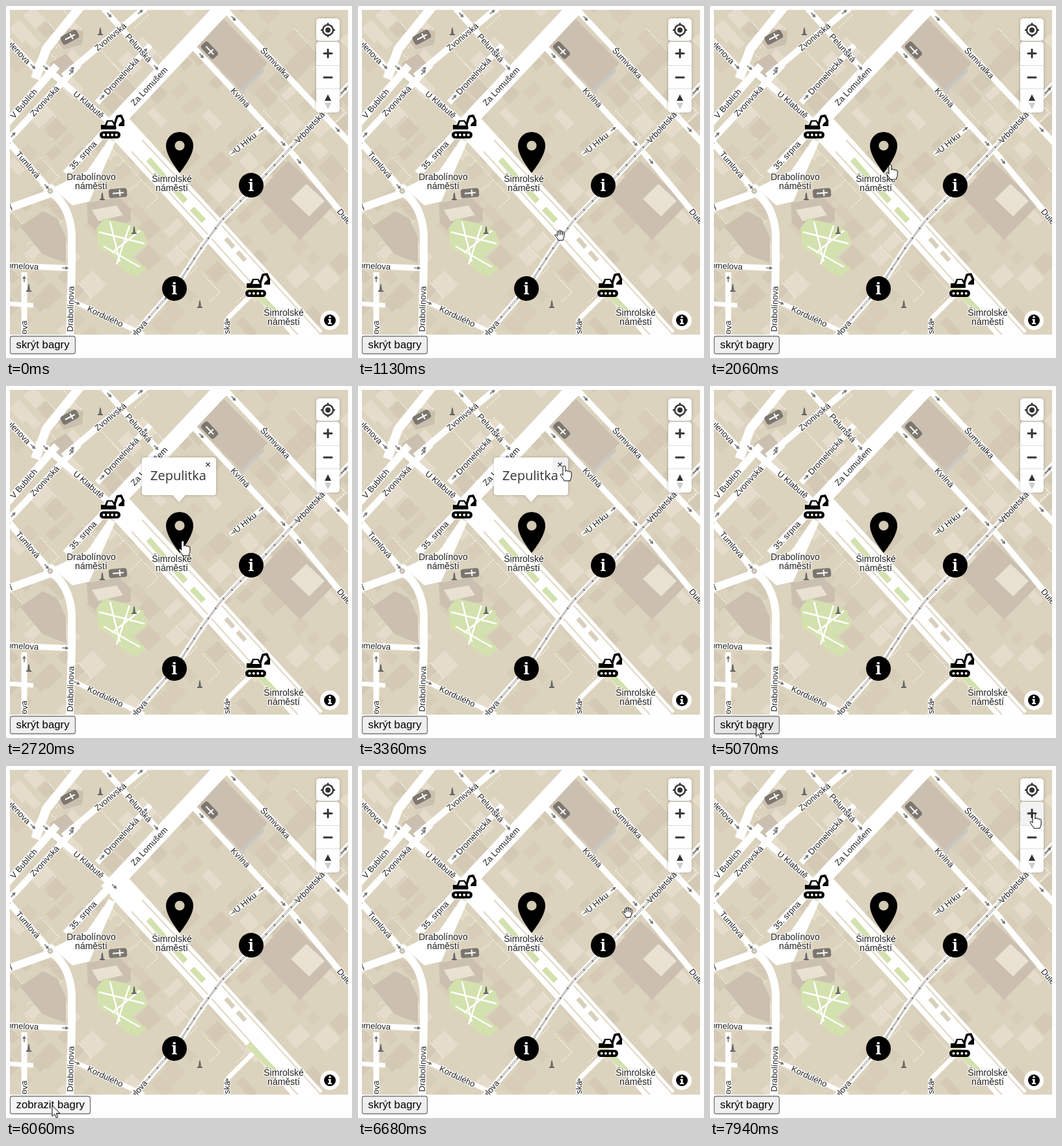
These frames come from a looping animation (532x542 px, 7.99 s). An HTML page:

```html
<!DOCTYPE html>
<html lang="cs">
<head>
<meta charset="utf-8">
<style>
html, body { margin: 0; width: 100%; height: 100%; overflow: hidden; background: #fefefe; }
svg { display: block; width: 532px; height: 542px; }
text { font-family: "Liberation Sans", Arial, sans-serif; }
.label { font-size: 13px; fill: #222; text-anchor: middle; stroke: #fff; stroke-width: 2.5px; stroke-opacity: .8; paint-order: stroke; stroke-linejoin: round; }
.square { font-size: 14px; }
.info { font: bold 25px "Noto Serif", serif; fill: #fff; text-anchor: middle; }
.line { fill: none; stroke-linejoin: round; }
.dots { stroke: #f8f4eb; stroke-width: 2; stroke-linecap: round; stroke-dasharray: 0 4.5; }
.panel { fill: #fff; filter: drop-shadow(0 0 2px rgba(0,0,0,.25)); }
.cursor { fill: #fff; stroke: #000; stroke-width: 1; stroke-linejoin: round; stroke-linecap: round; }
</style>
</head>
<body>
<svg viewBox="0 0 532 542">
  <defs>
    <clipPath id="frame"><path d="M6 6h520v500H6z"/></clipPath>
    <path id="tram" d="M530 119L440 216 385 275 330 332 300 373 263 430 190 514"/>
    <g id="digger">
      <rect y="27" width="32" height="11" rx="5.500"/>
      <path d="M2 24v-7h6l3-7h9l5 7v7z"/>
      <path class="line" stroke="#000" stroke-width="3.500" d="M22 19L27 4 33 3 37 12"/>
      <path d="M38 10v9h-9c0-5 4-5 6-9z"/>
      <path fill="#fff" d="M13 12h6l3 6H11z"/>
      <path class="line" stroke="#fff" stroke-width="4" stroke-linecap="round" stroke-dasharray="0 6.4" d="M6.500 32.500h20"/>
    </g>
    <path id="oneway" d="M-5 -.8H0V-3L5 0 0 3V.8H-5z" fill="#777"/>
    <path id="statue" d="M-4 6H4V4H2L1 -4Q0 -8 -1 -4L-2 4H-4z" fill="#666"/>
    <g id="church">
      <rect x="-14" y="-7" width="28" height="14" rx="4" fill="#7b766f"/>
      <path class="line" stroke="#fff" stroke-width="2" d="M-8 0H9M3-5V5"/>
    </g>
  </defs>

  <g clip-path="url(#frame)">
    <path fill="#dcd3be" d="M6 6h520v500H6z"/>
    <g id="blocks" transform="translate(266 256) rotate(47)"></g>
    <path fill="#cbc0af" d="M288 57L330 15 402 88 362 130zM385 290L434 238 505 306 452 360zM76 50l18-16 25 5-2 20-28 8zM68 88l24-15 14 16-19 22-20-3zM124 303l50-8 18 17v20l-32 6-16 12-18-15zM22 340l34-24 22 10 14 30v40l-36-14z"/>
    <path fill="#e9e1d2" d="M438 297l24-23 28 26-24 24zM132 314l38-7 10 15-38 9z"/>
    <path fill="#fff" d="M72 280l53-26 33-49 10 4-40 92-26 6z"/>
    <g id="roads" class="line" stroke="#fff">
      <path stroke-width="12" d="M72 288Q98 310 101 350V404"/>
      <path stroke-width="14" d="M45 112L62 66 115 0"/>
      <path stroke-width="7" d="M0 458L42 461M340 482L384 438"/>
    </g>

    <path fill="#d3e1ae" d="M139 342l12-15 34 8 26 11 6 23-24 17 23 18-15 13-21-9-18-25-20-10z"/>
    <path class="line" stroke="#fff" stroke-width="2.500" d="M143 348l70 18M160 332l15 62M190 338l-20 60M150 370l56 32M206 346l-43 34"/>

    <g class="line">
      <path stroke="#fff" stroke-width="40" d="M174 186L318 344 472 514"/>
      <path stroke="#e0d7c5" stroke-width="2" d="M193 224L306 347 454 512M209 206L330 336 486 508"/>
      <path stroke="#d3e1ae" stroke-width="9" d="M219 236L246 267M260 283L276 301M286 312L304 331M372 428L415 472"/>
      <path stroke="#d9d0bc" stroke-width="7" stroke-dasharray="18 9" d="M338 358L368 392"/>
      <use href="#tram" stroke="#fff" stroke-width="9"/>
      <use href="#tram" stroke="#8e8b86" y="-1.500"/>
      <use href="#tram" stroke="#8e8b86" y="1.500"/>
      <use href="#tram" stroke="#77746f" stroke-width="3" stroke-dasharray="2 17"/>
      <circle cx="68" cy="285" r="7" fill="#ddd4c1" stroke="#fff" stroke-width="7"/>
      <circle cx="68" cy="285" r="3.500" stroke="#999"/>
      <path stroke="#c9c7c4" stroke-width="5" d="M361 132L396 98"/>
    </g>
    <use href="#church" transform="translate(98 48) rotate(-28)"/>
    <use href="#church" transform="translate(313 68) rotate(47)"/>
    <use href="#church" transform="translate(172 288) rotate(-5)"/>
    <use href="#statue" x="145" y="39"/><use href="#statue" x="197" y="345"/>
    <use href="#statue" x="298" y="459"/><use href="#statue" x="148" y="293"/><use href="#statue" x="35" y="434"/>
    <g id="arrows"></g>
    <g id="labels"></g>
  </g>

  <g id="diggers"><use href="#digger" x="144" y="166"/><use href="#digger" x="368" y="410"/></g>
  <path fill-rule="evenodd" d="M267 257S246 232 246 215a21 21 0 0 1 42 0c0 17-21 42-21 42zM267 207.500a7.500 7.500 0 1 0 .01 0z"/>
  <circle cx="377" cy="276" r="19"/><text class="info" x="377" y="285">i</text>
  <circle cx="259" cy="435" r="19"/><text class="info" x="259" y="444">i</text>

  <rect class="panel" x="477" y="19" width="36" height="35" rx="5"/>
  <rect class="panel" x="477" y="55" width="36" height="109" rx="5"/>
  <path id="plusHover" fill="#f2f2f2" d="M482 55h26q5 0 5 5v31h-36V60q0-5 5-5z"/>
  <path class="line" stroke="#ddd" d="M477 91.500h36M477 127.500h36"/>
  <g class="line" stroke="#333" stroke-width="3">
    <circle cx="495" cy="37" r="8" stroke-width="2.500"/>
    <path stroke-width="2.500" d="M495 26v4M495 44v4M484 37h4M502 37h4"/>
    <path stroke-linecap="round" d="M489 73h12M495 67v12M489 110h12"/>
  </g>
  <circle cx="495" cy="37" r="4" fill="#333"/>
  <path fill="#333" d="M490 146l5-10 5 10z"/><path fill="#ccc" d="M490 149l5 10 5-10z"/>
  <circle cx="498" cy="484" r="15" fill="#fff"/><circle cx="498" cy="484" r="9"/>
  <path fill="#fff" d="M496.500 477.500h3v3h-3zM495.500 482h4v6h1.500v2h-6v-2h1.500v-4h-1z"/>

  <g id="popup">
    <path class="panel" d="M213 110h106q4 0 4 4v50q0 4-4 4h-43l-10 11-10-11h-43q-4 0-4-4v-50q0-4 4-4z"/>
    <path id="closeHover" fill="#f2f2f2" d="M299 110h20q4 0 4 4v18h-24z"/>
    <path class="line" stroke="#333" stroke-width="1.200" d="M307.500 118l6 6m0-6l-6 6"/>
    <text x="222" y="145" fill="#333" style="font:20px 'Open Sans',sans-serif">Zepulitka</text>
  </g>

  <rect id="button" x="6.500" y="508.500" height="27" rx="3" stroke="#767676" stroke-width="1.300"/>
  <text id="caption" x="15.500" y="527" font-size="16.800"></text>

  <g id="cursor" class="cursor">
    <path id="arrow" d="M0 0V16.500l3.800-3.600 2.500 5.900 2.400-1-2.500-5.900H11.500z"/>
    <path id="pointer" transform="translate(-8 -1)" d="M6 15V3a2 2 0 0 1 4 0v6.500c0-2 3.500-2 3.500.5 0-1.800 3.200-1.500 3.200.7 0-1.500 2.500-1.300 2.500 1V17c0 3-1.500 4-2 7H8c-.5-2.500-3.500-5-5.500-8.500-1-2 1.500-3 3.500-.5z"/>
    <path id="grab" transform="translate(-8 -9)" d="M4.500 10V4.500c0-2 2.600-2 2.600 0V3c0-2.200 2.700-2.200 2.700 0v1c0-2 2.600-2 2.600 0v1.500c0-2 2.600-2 2.600 0V10c0 3-1.600 4-1.800 7H6c-.5-2.500-2.500-4-5-7.200-1-1.600 1-2.600 3.500.2zM7.100 4.500v4M9.800 4v4M12.400 5v4"/>
  </g>
</svg>
<script>
const $ = id => document.getElementById(id);
const add = (id, markup) => $(id).insertAdjacentHTML('beforeend', markup);
const show = (id, on) => $(id).style.display = on ? '' : 'none';

let seed = 7;
const random = () => (seed = seed * 16807 % 2147483647) / 2147483647;

// Buildings and dotted passages scattered on a grid turned with the streets.
function buildBlocks() {
  const tones = ['#d3c9b5', '#e5dccb', '#d7cdb9'], pitch = 30, reach = 370;
  for (let u = -reach; u < reach; u += pitch) {
    for (let v = -reach; v < reach; v += pitch) {
      const w = pitch * (.4 + .7 * random()), h = pitch * (.4 + .7 * random());
      const tone = tones[Math.floor(random() * 6)];
      if (tone) add('blocks', `<rect x="${u}" y="${v}" width="${w}" height="${h}" fill="${tone}"/>`);
      if (random() < .08) add('blocks', `<path class="line dots" d="M${u} ${v}h${2 * w}v${h}"/>`);
    }
  }
}

// A street is a line that carries its own name, with one-way arrows near both ends.
function street(name, d, offset, width = 9) {
  const id = 'street' + $('roads').childElementCount;
  add('roads', `<path id="${id}" d="${d}" stroke-width="${width}"/>`);
  add('labels', `<text class="label" dy="4.500"><textPath href="#${id}" startOffset="${offset}%">${name}</textPath></text>`);
  if (width > 11) return;
  const line = $(id), length = line.getTotalLength();
  for (const share of [.1, .9]) {
    const a = line.getPointAtLength(length * share), b = line.getPointAtLength(length * share + 1);
    const angle = Math.atan2(b.y - a.y, b.x - a.x) * 180 / Math.PI;
    add('arrows', `<use href="#oneway" transform="translate(${a.x} ${a.y}) rotate(${angle})"/>`);
  }
}

function square(name, x, y) {
  [name, 'náměstí'].forEach((line, i) =>
    add('labels', `<text class="label square" x="${x}" y="${y + 14 * i}">${line}</text>`));
}

buildBlocks();
street('Za Lomušem', 'M155 193L336 0', 36, 24);
street('bulenova', 'M-14 36L48 100', 50, 10);
street('U Klabutě', 'M48 84L180 197', 60, 10);
street('Zvonivská', 'M88 108L220 -2', 55, 10);
street('Zvonivská', 'M0 210L112 90', 53, 10);
street('V Bublích', 'M-4 186L78 92', 38, 12);
street('Pelunská', 'M150 4L240 105', 60);
street('Dromelnická', 'M140 149L222 60', 46);
street('Šumivalka', 'M330 -2L530 212', 42);
street('Kvílná', 'M285 60L442 229', 48);
street('Dule', 'M442 229L530 336', 89);
street('Vrboletská', 'M440 216L530 119', 30);
street('U Hrku', 'M345 229L398 185', 43, 7);
street('35. srpna', 'M92 258L165 180', 36, 12);
street('Tumlová', 'M-4 200L70 287', 51, 10);
street('í', 'M0 313L64 290', 12, 12);
street('Drabolínova', 'M98 510L101 404', 41, 12);
street('omelova', 'M-4 399L102 404', 28);
street('Kordulého', 'M98 452L212 506', 48, 7);
street('lova', 'M190 514L263 430', 23);
street('lská', 'M339 514L340 482', 55);
street('ova', 'M28 510V410', 15);
square('Drabolínovo', 131, 268);
square('Šimrolské', 255, 271);
square('Šimrolské', 427, 477);

const LOOP = 7990, ENTRY = 770;
// Pointer moves: start, end, x, y.
const moves = [
  [770, 1370, 291, 271], [1780, 2060, 277, 244], [2060, 2360, 271, 240], [2670, 3360, 317, 123],
  [4199, 4200, 280, 160], [4200, 4970, 71, 519], [5020, 5070, 71, 523], [6460, 6680, 414, 225],
  [7020, 7810, 500, 77], [7860, 7940, 498, 73]
];
const clamp = p => Math.min(1, Math.max(0, p));
const ease = p => p * p * (3 - 2 * p);

function pointerAt(t) {
  return moves.reduce(([x, y], [start, end, toX, toY]) => {
    const p = ease(clamp((t - start) / (end - start)));
    return [x + (toX - x) * p, y + (toY - y) * p];
  }, [345, 505]);
}

function draw() {
  const t = performance.now() % LOOP;
  const during = (start, end) => t >= start && t < end;
  const visible = t >= ENTRY;
  const [x, y] = pointerAt(t);
  const within = (l, top, r, b) => visible && x >= l && x <= r && y >= top && y <= b;

  const popup = during(2360, 3630);
  const onClose = popup && within(299, 110, 323, 132);
  const onPopup = popup && within(209, 110, 323, 168);
  const onControls = within(477, 19, 513, 164);
  const onMarker = within(246, 194, 288, 257) || Math.hypot(x - 377, y - 276) < 19;
  const kind = onClose || onControls || onMarker ? 'pointer' : onPopup || y > 504 ? 'arrow' : 'grab';

  show('popup', popup);
  show('closeHover', onClose);
  show('plusHover', within(477, 55, 513, 91));

  const hidden = during(5350, 6140);
  const pressed = during(5250, 5350) || during(6060, 6140);
  show('diggers', !hidden);
  $('caption').textContent = hidden ? 'zobrazit bagry' : 'skrýt bagry';
  $('button').setAttribute('width', Math.round($('caption').getComputedTextLength() + 18));
  $('button').setAttribute('fill', pressed ? '#f5f5f5' : within(6, 509, 130, 536) ? '#e5e5e5' : '#efefef');

  show('cursor', visible);
  $('cursor').setAttribute('transform', `translate(${x.toFixed(1)} ${y.toFixed(1)})`);
  for (const id of ['arrow', 'pointer', 'grab']) show(id, id === kind);
  requestAnimationFrame(draw);
}
draw();
</script>
</body>
</html>
```
